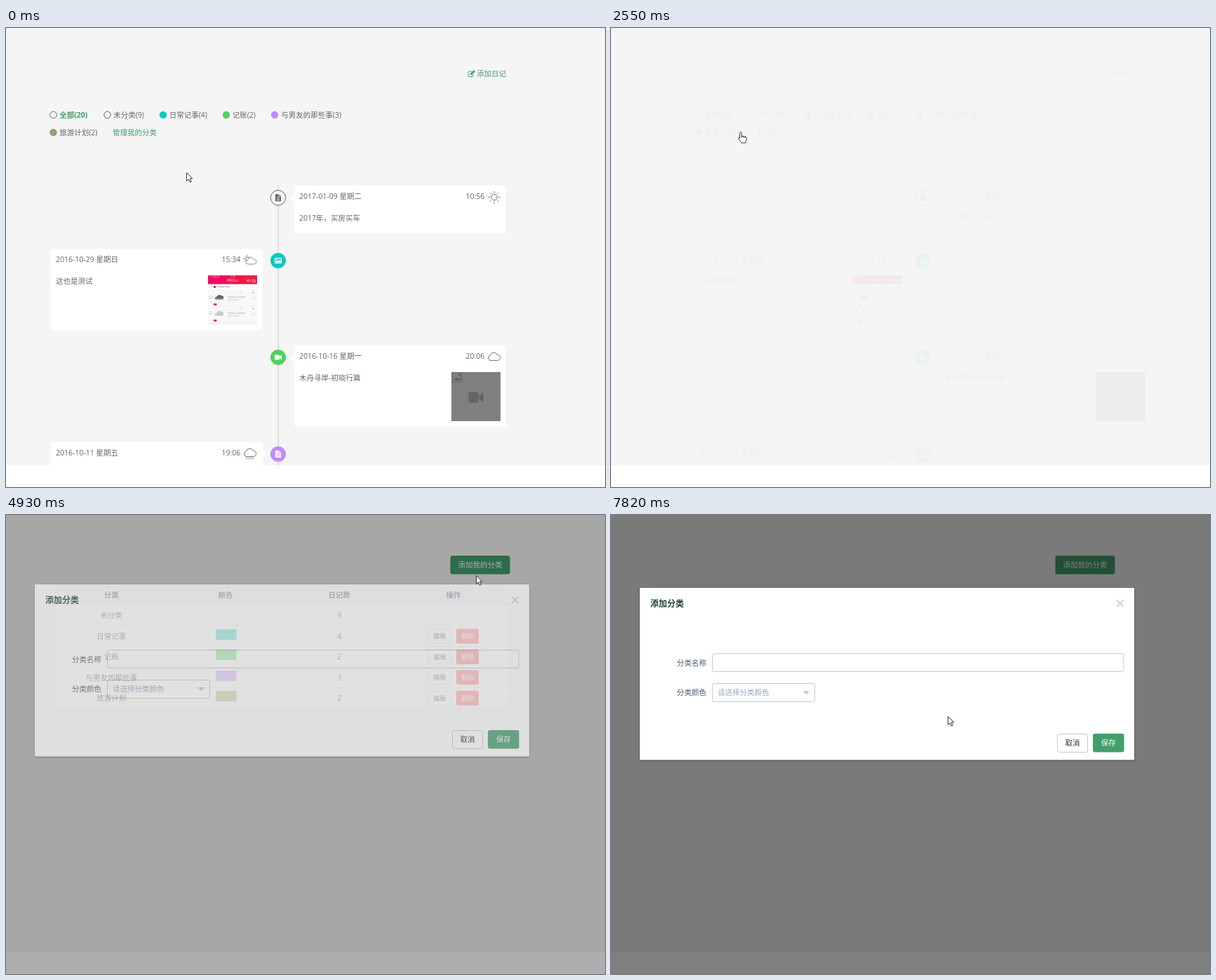
These frames come from a looping animation (854 px wide and 655 px high, 7990 ms). An HTML page:

```html
<!DOCTYPE html>
<html lang="zh-CN">
<head>
<meta charset="utf-8">
<title>日记分类</title>
<style>
html, body { margin: 0; width: 100%; height: 100%; overflow: hidden; background: #fff; }
svg { display: block; width: 854px; height: 655px; }
text { font-family: "Open Sans", "Noto Sans CJK SC", "Noto Sans CJK", sans-serif; white-space: pre; }
#dialog { filter: drop-shadow(0 1px 1.5px rgba(0,0,0,.35)); }
</style>
</head>
<body>
<svg id="stage" viewBox="0 0 854 655" xmlns="http://www.w3.org/2000/svg"></svg>
<script>
const LOOP = 7990, STEP = 170;
const GREEN = '#429e6b', INK = '#666', LINE = '#dfe6ec';
const TEAL = '#0bc9c0', LIME = '#4fd459', VIOLET = '#c28afc';

// Markup helpers; text is placed by its vertical centre
const text = (x, cy, s, fill = INK, o = {}) =>
  `<text x="${x}" y="${cy + (o.size || 10.5) * .37}" font-size="${o.size || 10.5}" fill="${fill}"` +
  ` font-weight="${o.bold ? 700 : 400}" text-anchor="${o.mid ? 'middle' : 'start'}"${o.id ? ` id="${o.id}"` : ''}>${s}</text>`;
const rect = (x, y, w, h, fill, extra = '') =>
  `<rect x="${x}" y="${y}" width="${w}" height="${h}" fill="${fill}" ${extra}/>`;
const circle = (x, y, r, fill, stroke = 'none') =>
  `<circle cx="${x}" cy="${y}" r="${r}" fill="${fill}" stroke="${stroke}"/>`;
const path = (d, fill = 'none', stroke = 'none', w = 1) =>
  `<path d="${d}" fill="${fill}" stroke="${stroke}" stroke-width="${w}"/>`;
const at = (x, y, body) => `<g transform="translate(${x} ${y})">${body}</g>`;

// Icons, centred on the origin
const cloudPath = 'M-5 5.5a3.7 3.7 0 0 1-.6-7.3a5 5 0 0 1 9.4-1.3a4.3 4.3 0 0 1 1 8.6z';
const cloud = path(cloudPath, '#fff', INK, .9);
const rays = (from, to, list) => list.map(i => {
  const c = Math.cos(i * Math.PI / 4), s = Math.sin(i * Math.PI / 4);
  return `M${c * from} ${s * from}L${c * to} ${s * to}`;
}).join('');
const weather = {
  sun: circle(0, 0, 4.3, 'none', INK) + path(rays(6.3, 8.6, [0, 1, 2, 3, 4, 5, 6, 7]), 'none', INK),
  partly: at(-4, -2, circle(0, 0, 2.6, 'none', INK) + path(rays(4, 5.6, [3, 4, 5, 6, 7]), 'none', INK, .9)) +
    `<g transform="translate(1.5 .8) scale(.85)">${cloud}</g>`,
  cloud: at(0, -.5, cloud),
  rain: at(0, -1.5, cloud) + path('M-4 5l-1.5 3M-1 5l-1.5 3M2 5l-1.5 3M5 5l-1.5 3', 'none', INK, .9),
};
const docIcon = (fill, rule) =>
  path('M-4-5H1.5L4-2.3V5H-4z', fill) + path('M-2-.5H2M-2 1.4H2M-2 3.2H2M1.3-4.6V-2.1H3.8', 'none', rule, .8);
const photoIcon = rect(-5, -4, 10, 8, '#fff', 'rx="1"') + rect(-3.9, -2.9, 7.8, 5.8, TEAL) +
  circle(-2, -1.2, 1, '#fff') + path('M-3.5 2.5V1.5L-1.7 0-.6 1 1.8-1.4 3.5.5V2.5z', '#fff');
const videoIcon = fill => rect(-5, -3.6, 6.8, 7.2, fill, 'rx="1.3"') + path('M2-.9L5-3.4V3.4L2 .9z', fill);
const editIcon = path('M7 6v2a1.5 1.5 0 0 1-1.5 1.5h-4A1.5 1.5 0 0 1 0 8V3.6A1.5 1.5 0 0 1 1.5 2H5', 'none', GREEN) +
  path('M3 7V5L8 0l2 2-5 5z', GREEN);

function shopThumb() {
  const item = (y, tone) => circle(4, y, 2.1, '#fff', '#ccc') +
    path(`M9.5 ${y + 3}q0-3 2-3l4-3.6 2.6 1 4 1.4v4.2q-6 1.6-12.6 0z`, tone) +
    path(`M9.5 ${y + 2.8}h12.7`, 'none', '#ccc', .8) +
    text(29, y - 6, '−', '#777', { size: 5 }) + text(46, y - 6, '1', '#777', { size: 4 }) + text(63, y - 6, '+', '#777', { size: 5 }) +
    text(28, y, '轻便跑步运动鞋男款', '#aaa', { size: 2.8 }) + text(28, y + 3.5, '颜色尺码默认', '#bbb', { size: 2.8 }) +
    text(63, y + 2, '¥9', '#bbb', { size: 3 }) + rect(8, y + 9, 4.5, 3, '#e2344b', 'rx="1"');
  return rect(0, 0, 70, 70, '#f8f8f8') + rect(0, 0, 70, 12.5, 'url(#shop)') +
    text(1, 2.2, '•••• 中国 4G', '#ffd5df', { size: 2.8 }) + text(35, 2.2, '15:33', '#ffd5df', { size: 2.8, mid: 1 }) +
    text(35, 8, '购物车(2)', '#ffdfe3', { size: 4, mid: 1 }) + text(55, 8, '编辑', '#ffdfe3', { size: 3 }) +
    rect(63.5, 6.3, 3.5, 3, 'none', 'stroke="#ffdfe3" stroke-width=".7"') +
    rect(0, 13, 70, 7, '#fff') + circle(4, 16.5, 1.6, '#fff', '#ddd') + rect(8, 15, 3, 3, '#a44') +
    text(12.5, 16.5, '运动用品专卖店 ›', '#666', { size: 2.7 }) +
    item(31, '#666') + rect(0, 43.5, 70, .6, '#eee') + item(54, '#c9c9c9') + rect(0, 67, 70, 3, '#f3f3f3');
}

function card(left, y, h, date, time, sky, body) {
  const x = left ? 63 : 411, edge = left ? 366 : 411, tip = left ? 371 : 406;
  return rect(x, y, left ? 303 : 302, h, '#fff', 'rx="3"') +
    path(`M${edge} ${y + 11}L${tip} ${y + 17}L${edge} ${y + 23}z`, '#fff') +
    text(x + (left ? 8 : 7), y + 15.5, date) + text(x + 244.4, y + 15.5, time) +
    at(x + 285, y + 16.5, weather[sky]) + text(x + (left ? 8 : 7), y + 45.7, body);
}

function diary() {
  const legend = [[67.5, 124, '#f5f5f5'], [144.5, 124, '#f5f5f5'], [224, 124, TEAL],
    [314, 124, LIME], [383, 124, VIOLET], [67.5, 149, '#8fa573']];
  const names = ['全部(20)', '未分类(9)', '日常记事(4)', '记账(2)', '与男友的那些事(3)', '旅游计划(2)'];
  const grey = at(635, 491, rect(0, 0, 70, 70, '#808080') +
    rect(1.5, 1.5, 13, 13, 'none', 'stroke="#686868"') + path('M3 12l4-5 3 3 3-2v4zM9 3h4v4z', '#5f5f5f') +
    `<g transform="translate(35 36) scale(2.15)">${videoIcon('#656565')}</g>`);
  return at(659, 60, editIcon) + text(671, 65.3, '添加日记', GREEN) +
    legend.map(([x, y, c], i) => (i < 2 ? circle(x, y, 4.8, c, INK) : circle(x, y, 5.2, c)) +
      text(x + (i === 4 ? 9.3 : 8.7), y + .2, names[i], i ? INK : GREEN, { bold: !i })).join('') +
    text(152, 149.2, '管理我的分类', GREEN) +
    rect(387.5, 225, 1, 399, '#c4c4c4') +
    card(0, 225, 68, '2017-01-09 星期二', '10:56', 'sun', '2017年，买房买车') +
    card(1, 315, 116, '2016-10-29 星期日', '15:34', 'partly', '这也是测试') + at(288, 353, shopThumb()) +
    card(0, 453, 116, '2016-10-16 星期一', '20:06', 'cloud', '木舟寻岸-初晓行篇') + grey +
    card(1, 591, 60, '2016-10-11 星期五', '19:06', 'rain', '') +
    at(388, 242.3, circle(0, 0, 10.7, '#f5f5f5', INK) + docIcon(INK, '#f5f5f5')) +
    at(388, 332, circle(0, 0, 11, TEAL) + photoIcon) +
    at(388, 470, circle(0, 0, 11, LIME) + videoIcon('#fff')) +
    at(388, 608, circle(0, 0, 11, VIOLET) + docIcon('#fff', VIOLET));
}

function table() {
  const rows = [['未分类', 9], ['日常记事', 4, TEAL], ['记账', 2, LIME], ['与男友的那些事', 3, VIOLET], ['旅游计划', 2, '#96b855']];
  const cols = [150.3, 313, 475.3, 638], dark = '#1f2d3d', pitch = 29.45;
  let out = rect(633.5, 58, 85, 26.5, GREEN, 'rx="3" id="add"') + text(676, 71.3, '添加我的分类', '#fff', { mid: 1 }) +
    rect(68, 99, 651, 177, '#fff') + rect(68, 99, 651, 29.5, '#eef1f6') +
    rect(68, 128.5, 651, pitch, '#eef6f2', 'id="hover"');
  ['分类', '颜色', '日记数', '操作'].forEach((s, i) => out += text(cols[i], 114.3, s, dark, { mid: 1, bold: 1 }));
  rows.forEach(([name, n, color], i) => {
    const top = 128.5 + i * pitch, cy = top + 14.8;
    out += rect(68, Math.round(top - .5), 651, 1, LINE) +
      text(cols[0], cy, name, dark, { mid: 1 }) + text(cols[2], cy, n, dark, { mid: 1 });
    if (color) out += rect(299, Math.round(top + 5), 29.5, 15, color) +
      rect(602.5, cy - 9.8, 31.5, 20, '#fff', 'rx="2.5" stroke="#c4cfdb"') + text(618.3, cy + .2, '编辑', dark, { mid: 1, size: 9 }) +
      rect(642, cy - 10.3, 32, 21, '#ff4d51', 'rx="2.5"') + text(658, cy + .2, '删除', '#fff', { mid: 1, size: 9 });
  });
  return out + rect(68.5, 99.5, 650, 176, 'none', `stroke="${LINE}"`);
}

function dialog() {
  const border = 'rx="2.5" stroke="#bfcbd9"';
  return rect(41, 104, 705, 245.5, '#fff', 'rx="1.5"') +
    text(56, 126.3, '添加分类', '#1f4136', { bold: 1, size: 12 }) +
    path('M721 121.2l10 10m0-10l-10 10', 'none', '#b9c7d6', 1.5) +
    text(94, 211, '分类名称', '#48576a') + text(94, 253.5, '分类颜色', '#48576a') +
    rect(144.5, 197.8, 586.5, 25.7, '#fff', border + ' id="input"') +
    rect(144.5, 240.5, 146, 26, '#fff', border) + text(152, 253.5, '请选择分类颜色', '#97a8be') +
    path('M273.5 251h9.5l-4.7 5.3z', '#bfcbd9') +
    rect(636.5, 312.5, 43, 26, '#fff', border + ' id="cancel"') + text(658, 325.5, '取消', '#1f2d3d', { mid: 1, id: 'cancelText' }) +
    rect(687, 312, 44.5, 26.5, GREEN, 'rx="3"') + text(709.3, 325.5, '保存', '#fff', { mid: 1 });
}

const pointers = {
  arrow: path('M.5.5V12.3L3.2 9.8L5.3 14.2L7.2 13.3L5.2 9H8.9z', '#fff', '#222', .9),
  hand: path('M3.8.5C4.8.5 5.2 1.1 5.2 2V6L10 7C11.5 7.3 12.3 8 12.3 9.5C12.3 11.5 11 12.8 11 16H5C4.5 13.5 1 11.5.5 9' +
    'C.6 7.8 1.8 7.9 2.6 9.2V2C2.6 1.1 2.9.5 3.8.5zM5.2 6v2.5M7.6 6.6v2M9.9 7.1v2', '#fff', '#222', .9),
  beam: path('M-2.5-6.5H-.8L0-6L.8-6.5H2.5M0-6V6M-2.5 6.5H-.8L0 6L.8 6.5H2.5', 'none', '#333'),
};

// ms, x, y, pointer shape from here on
const track = [
  [340, 257, 206, 'arrow'], [510, 243, 192, 'arrow'], [850, 204, 155, 'arrow'], [1020, 190, 141, 'hand'],
  [1190, 184.5, 145.5, 'hand'], [1530, 180, 148.5, 'hand'], [2720, 181, 148, 'arrow'], [3060, 189, 144, 'arrow'],
  [3400, 189, 144, 'arrow'], [3570, 232, 137, 'arrow'], [3910, 500, 96, 'arrow'], [4080, 622, 80, 'arrow'],
  [4250, 674, 73, 'arrow'], [4760, 674, 73, 'arrow'], [4930, 670, 86, 'arrow'], [5440, 592, 184, 'arrow'],
  [5610, 561, 204, 'beam'], [5780, 540, 214, 'beam'], [5950, 525, 240, 'arrow'], [6120, 536, 262, 'arrow'],
  [6290, 565, 281, 'arrow'], [6630, 617, 298, 'arrow'], [6800, 642, 317, 'hand'], [6970, 652, 322, 'hand'],
  [7140, 640, 319, 'hand'], [7310, 612, 313, 'arrow'], [7650, 508, 291, 'arrow'], [7820, 480, 287, 'arrow'],
];

const $ = id => document.getElementById(id);
$('stage').innerHTML =
  '<defs><linearGradient id="shop"><stop stop-color="#f5056e"/><stop offset="1" stop-color="#ea2038"/></linearGradient>' +
  '<clipPath id="view"><rect width="854" height="624"/></clipPath></defs>' +
  rect(0, 0, 854, 655, '#fff') + rect(0, 0, 854, 624, '#f5f5f5') +
  `<g clip-path="url(#view)"><g id="diary">${diary()}</g><g id="table">${table()}</g></g>` +
  rect(0, 0, 854, 655, '#000', 'id="shade"') + `<g id="dialog">${dialog()}</g>` +
  Object.keys(pointers).map(k => `<g id="${k}">${pointers[k]}</g>`).join('');

const set = (id, attrs) => { for (const k in attrs) $(id).setAttribute(k, attrs[k]); };
const place = (id, x, y, opacity) =>
  set(id, { transform: `translate(${x} ${y})`, opacity, visibility: opacity > 0 ? 'visible' : 'hidden' });
const within = (t, a, b) => t >= a && t < b;

// cubic-bezier(.25, .1, .25, 1) over 590 ms
function ease(t, start) {
  const x = (t - start) / 590;
  if (x <= 0) return 0;
  if (x >= 1) return 1;
  let lo = 0, hi = 1;
  for (let i = 0; i < 20; i++) {
    const u = (lo + hi) / 2, v = 1 - u;
    if (.75 * u * v + u * u * u < x) lo = u; else hi = u;
  }
  return .3 * lo * (1 - lo) ** 2 + 3 * lo * lo * (1 - lo) + lo ** 3;
}

function pointerAt(t) {
  const i = track.findIndex(k => k[0] > t);
  if (i === 0) return track[0].slice(1);
  if (i < 0) return track[track.length - 1].slice(1);
  const a = track[i - 1], b = track[i], p = (t - a[0]) / (b[0] - a[0]);
  return [a[1] + (b[1] - a[1]) * p, a[2] + (b[2] - a[2]) * p, a[3]];
}

function draw(ms) {
  const t = Math.floor((ms % LOOP) / STEP) * STEP;
  const leave = ease(t, 2125), enter = ease(t, 2963), open = ease(t, 4713);
  place('diary', Math.round(60 * leave), 0, 1 - leave);
  place('table', Math.round(60 * (1 - enter)), 0, enter);
  place('dialog', 0, Math.round(-15 * (1 - open)), open);
  set('shade', { opacity: .5 * open });

  set('hover', { opacity: within(t, 3060, 3740) ? 1 : 0 });
  set('add', { fill: within(t, 4080, 4930) ? '#67b189' : GREEN });
  set('input', { stroke: within(t, 5780, 5950) ? '#8391a5' : within(t, 5610, 5780) ? '#b0bccb' : '#bfcbd9' });
  const onCancel = within(t, 6800, 7310);
  set('cancel', { stroke: onCancel ? GREEN : '#bfcbd9' });
  set('cancelText', { fill: onCancel ? GREEN : '#1f2d3d' });

  const [x, y, shape] = pointerAt(t);
  for (const k in pointers) place(k, Math.round(x), Math.round(y), k === shape ? 1 : 0);
}

function tick() {
  draw(performance.now());
  requestAnimationFrame(tick);
}
tick();
</script>
</body>
</html>
```
